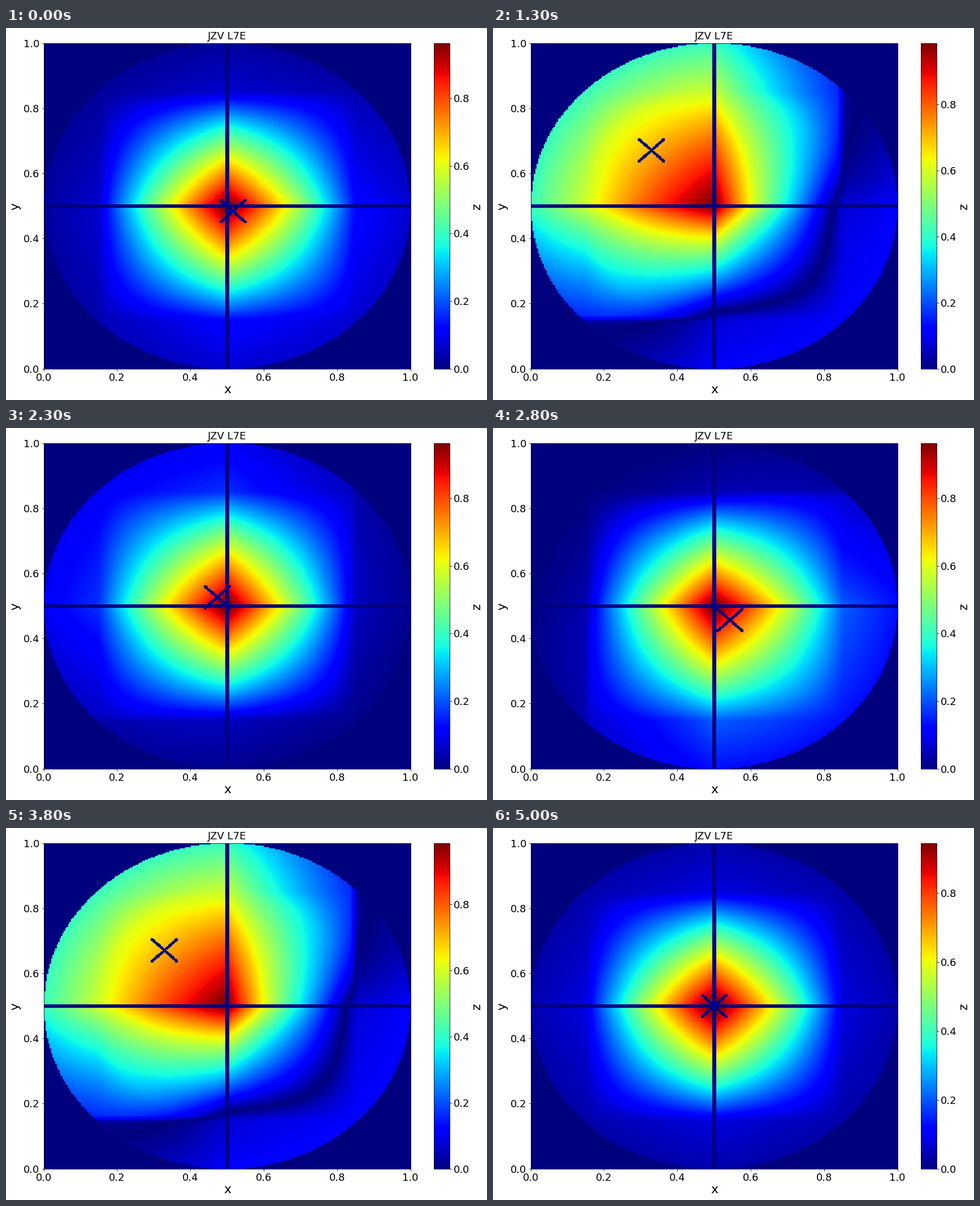
A matplotlib script that plays this animation: 851x658 px, repeating every 5.1 s.

```python
import numpy as np
import matplotlib.pyplot as plt
from matplotlib.animation import FuncAnimation

W, H, DPI = 851, 658, 64
CELLS = 257
FRAMES, INTERVAL = 51, 100
STEP = 0.02 / np.sqrt(2)      # marker shift per frame along x and -y
HALF = 0.35                   # half width of the central pyramid

plt.rcParams["font.family"] = "DejaVu Sans"


def px(size):
    """Pixels to points."""
    return size * 72 / DPI


def box(left, top, right, bottom):
    return fig.add_axes([left / W, 1 - bottom / H, (right - left) / W, (bottom - top) / H])


def label(x, y, text, size, rotation=0):
    fig.text(x / W, 1 - y / H, text, fontsize=px(size), rotation=rotation,
             ha="center", va="baseline", rotation_mode="anchor")


def style(ax):
    ax.tick_params(labelsize=px(18), length=px(3.5), width=px(0.8), pad=px(3.5))
    for spine in ax.spines.values():
        spine.set_linewidth(px(0.8))


cells = np.arange(CELLS) - CELLS // 2
I, J = np.meshgrid(cells, cells)
u, v = I / CELLS, J / CELLS
au, av = np.abs(u), np.abs(v)
r = np.hypot(u, v)

peak = np.clip(1 - au / HALF, 0, 1) * np.clip(1 - av / HALF, 0, 1)
halo = 0.18 * (1 - 1.57 * au) * (1 - 1.57 * av)
gain = 0.34 - 0.6 * np.clip(r - HALF, 0, None)
loss = 0.1 + 0.27 * np.exp(-(r / 0.18) ** 2)
weight = au / (au + av + 1e-9)
blocked = (r > 0.5) | (np.abs(I) <= 1) | (np.abs(J) <= 1)


def shade(side):
    """Dim the far side beyond the edge of the pyramid."""
    k = np.clip((-side - 0.335) / 0.025, 0, 1)
    return 1 - 0.7 * k * k * (3 - 2 * k)


def field(frame):
    t = (max(frame, 1) + 12) % 25 - 12
    shift = t * STEP
    p, q = u * np.sign(t), -v * np.sign(t)
    push = (weight * np.where(p > 0, gain * shade(q), -loss)
            + (1 - weight) * np.where(q > 0, gain * shade(p), -loss))
    z = np.abs(peak + (1 - peak) * (halo + abs(t) / 8 * push))

    c = round(shift * CELLS)
    di, dj = np.abs(I - c), np.abs(J + c)
    cross = (np.maximum(di, dj) <= 9) & (np.abs(di - dj) <= 1)
    z[blocked | cross] = 0
    return z


fig = plt.figure(figsize=(W / DPI, H / DPI), dpi=DPI, facecolor="white")
ax = box(66.5, 26.5, 715.5, 602.5)
cax = box(757, 26.5, 785, 602.5)

image = ax.imshow(field(0), cmap="jet", origin="lower", extent=[0, 1, 0, 1],
                  aspect="auto", interpolation="nearest", vmin=0, vmax=1)
ticks = np.arange(6) / 5
ax.set_xticks(ticks)
ax.set_yticks(ticks)
bar = fig.colorbar(image, cax=cax, ticks=ticks[:5])
bar.outline.set_linewidth(px(0.8))
style(ax)
style(cax)

label(391, 20.5, "JZV L7E", 18)
label(391.5, 646, "x", 22)
label(22.5, 315, "y", 22, 90)
label(839.5, 315, "z", 22, 90)


def update(frame):
    z = field(frame)
    image.set_data(z)
    image.set_clim(0, z.max())
    return [image]


anim = FuncAnimation(fig, update, frames=FRAMES, interval=INTERVAL,
                     repeat=True, repeat_delay=0, blit=False)
plt.show()
```
